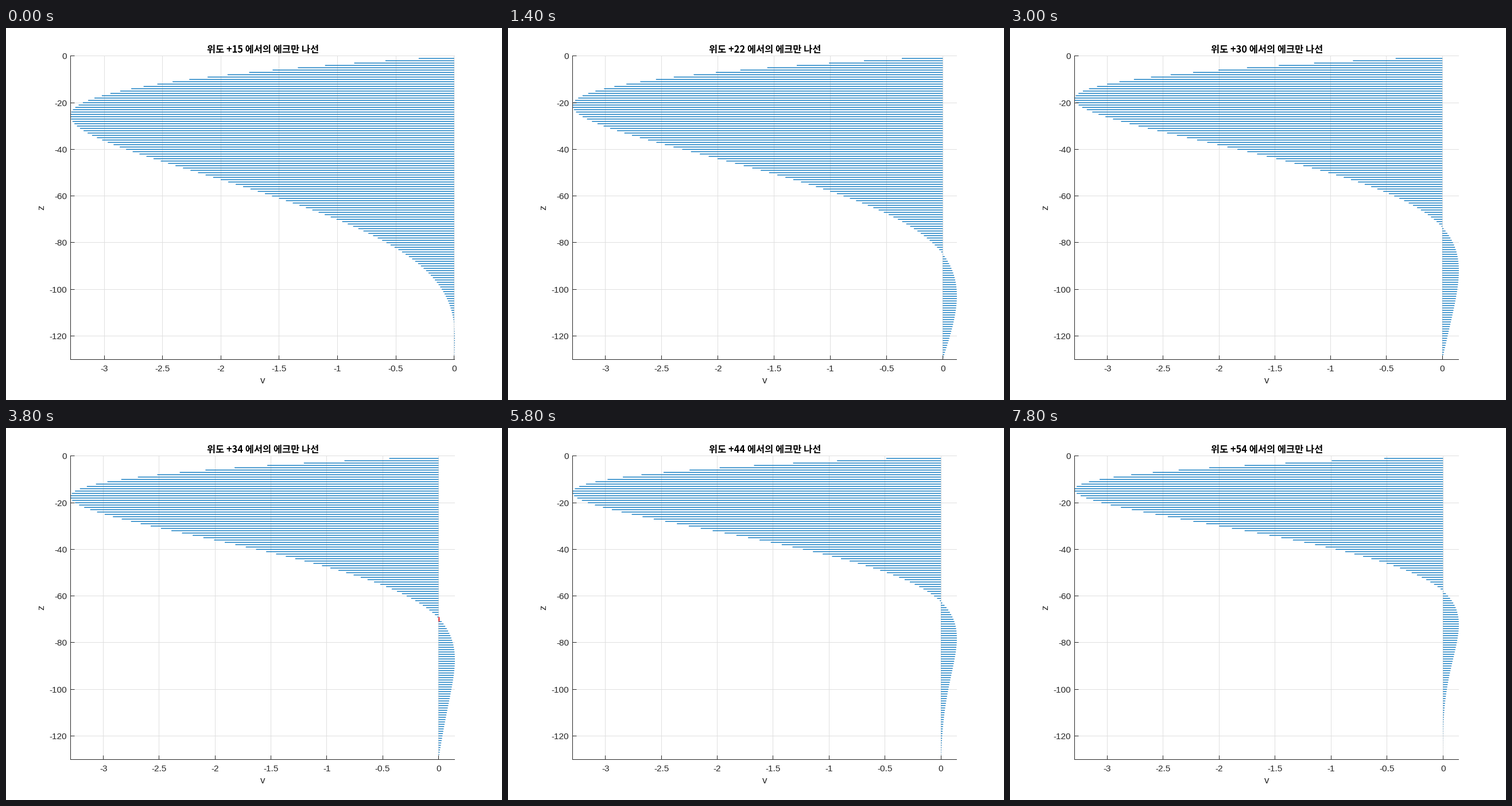
Write a matplotlib script that moves like this. It is 864x648 px and loops after 8000 ms.

```python
import matplotlib.pyplot as plt
import numpy as np
from matplotlib.animation import FuncAnimation
from matplotlib.collections import LineCollection

W, H = 864, 648
LEFT, RIGHT, TOP, BOTTOM = 112.32, 781.92, 48.9, 577.02
BLUE, DARK, GRID = "#0072BD", "#262626", "#dfdfdf"
STEP = 200
FIRST_LAT, LAST_LAT = 15, 54

DEPTH = 130                # sea floor, m
VISCOSITY = 0.02           # eddy viscosity, m^2/s
OMEGA = 7.2921e-5          # rotation of the earth, 1/s
z = np.arange(0, -DEPTH - 1, -1)
SURFACE = 0.9 * DEPTH / np.sqrt(len(z))
MARK_SHARE = 0.2           # real length of the marker arrow against the bars


def ekman_v(lat):
    """Cross-stream part of an Ekman spiral over a floor at DEPTH."""
    f = 2 * OMEGA * np.sin(np.radians(lat))
    a = (1 + 1j) / np.sqrt(2 * VISCOSITY / f)
    return SURFACE * (np.sinh(a * (DEPTH + z)) / np.sinh(a * DEPTH)).imag


def pixel(p):
    return np.floor(p) + 0.5


def y_of(depth):
    return TOP - depth * (BOTTOM - TOP) / DEPTH


plt.rcParams["font.family"] = "Liberation Sans"
fig = plt.figure(figsize=(W / 72, H / 72), dpi=72, facecolor="white")
ax = fig.add_axes([0, 0, 1, 1])
ax.set_xlim(0, W)
ax.set_ylim(H, 0)
ax.axis("off")


def lines(color, width, order, segments=()):
    group = LineCollection(segments, colors=color, linewidths=width,
                           zorder=order, capstyle="butt")
    group.set_snap(False)
    ax.add_collection(group, autolim=False)
    return group


def label(x, y, text, size=15.4, ha="center", **kw):
    return ax.text(x, y, text, fontsize=size, color=DARK, ha=ha, **kw)


# Parts that stay still
rows = y_of(z)
z_ticks = np.arange(0, -121, -20)
tick_rows = pixel(y_of(z_ticks))
edge_x, edge_y = pixel(LEFT), pixel(BOTTOM)
lines(GRID, 1, 1, [[(LEFT, y), (RIGHT, y)] for y in tick_rows])
lines(DARK, 1, 4, [[(edge_x, TOP - 0.9), (edge_x, edge_y + 0.5)],
                   [(edge_x, edge_y), (RIGHT, edge_y)]]
      + [[(edge_x, y), (edge_x + 7, y)] for y in tick_rows])
for t, y in zip(z_ticks, tick_rows):
    label(106.3, y + 5.5, str(t), ha="right", va="baseline")
label(447, 619, "v", 17, va="baseline")
label(62, 312.6, "z", 17, va="center", rotation=90)

# Parts that follow the latitude
title = ax.text(447.3, 42.5, "", fontsize=16.4, weight="bold", color="black",
                family="Noto Sans CJK JP", ha="center", va="baseline")
x_ticks = np.arange(-3, 0.1, 0.5)
x_labels = [label(0, 597.7, f"{t:g}", va="baseline") for t in x_ticks]
x_grid = lines(GRID, 1, 1)
bars = lines(BLUE, 1.35, 3)
x_marks = lines(DARK, 1, 4)
reversal = lines("#ff0000", 1.6, 5)


def reversal_mark(v, zero, scale):
    """Thick, very short arrow where the flow turns back; it only shows
    when it covers the centre of a pixel column."""
    turn = np.argmax(v > 1e-9)
    if turn == 0:
        return []
    k = turn if v[turn] < -v[turn - 1] else turn - 1
    dx = v[k] * scale
    if np.floor(zero - 0.5) == np.floor(zero + MARK_SHARE * dx - 0.5):
        return []
    x, y = zero + dx / 2, y_of(z[k])
    return [[(x, y - 4), (x, y + 4)]]


def draw(i):
    lat = FIRST_LAT + i
    v = ekman_v(lat)
    scale = (RIGHT - LEFT) / (v.max() - v.min())
    zero = LEFT - v.min() * scale

    title.set_text(f"위도 +{lat} 에서의 에크만 나선")
    bars.set_segments([[(zero, y), (zero + s * scale, y)]
                       for y, s in zip(rows, v)])
    xs = zero + x_ticks * scale
    x_grid.set_segments([[(x, TOP), (x, BOTTOM)] for x in pixel(xs)])
    x_marks.set_segments([[(x, edge_y - 7), (x, edge_y)] for x in pixel(xs)])
    for text, x in zip(x_labels, xs):
        text.set_x(x)
    reversal.set_segments(reversal_mark(v, zero, scale))
    return title, bars, x_grid, x_marks, reversal, *x_labels


anim = FuncAnimation(fig, draw, frames=LAST_LAT - FIRST_LAT + 1,
                     init_func=lambda: draw(0), interval=STEP,
                     repeat=True, repeat_delay=0, blit=False)
plt.show()
```
